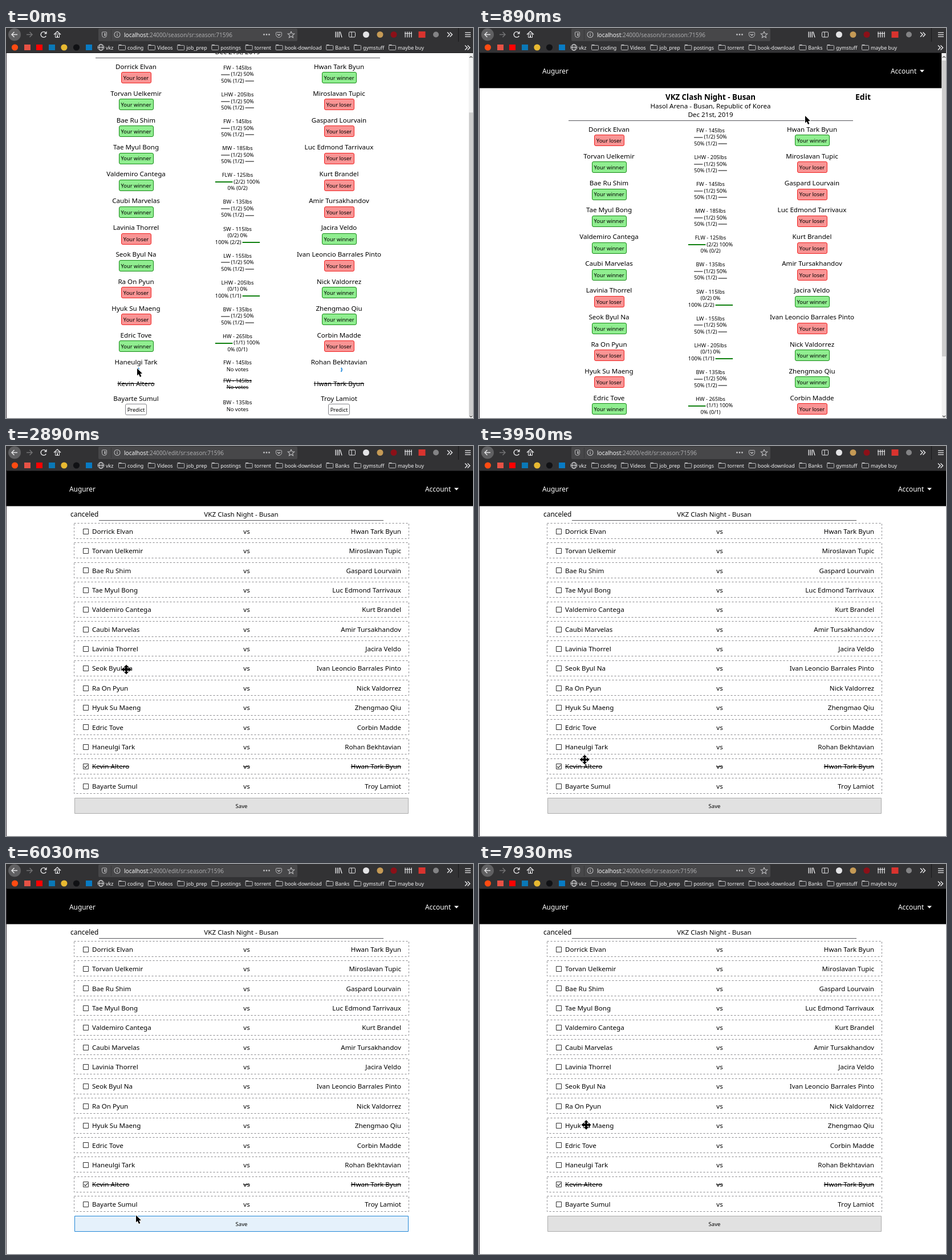
An HTML page with a canvas for the animation above (8 s loop, 819x684 px).

```html
<!DOCTYPE html>
<html lang="en">
<head>
<meta charset="utf-8">
<title>Fight predictions</title>
<style>
html, body { margin: 0; width: 100%; height: 100%; overflow: hidden; background: #fff; }
canvas { display: block; }
</style>
</head>
<body>
<canvas id="stage" width="819" height="684"></canvas>
<script>
const ctx = document.getElementById('stage').getContext('2d');
const LOOP = 8000, TICK = 125, FIRST_TICK = 15;
const SANS = '"Noto Sans", "Open Sans", sans-serif';
const VOTED = 140, EDIT_PAGE = 1680, CHECKED = 4930, UNCHECKED = 5360;
const EVENT = 'VKZ Clash Night - Busan';
const ROW_TOP = 135.6, ROW_PITCH = 34.38, ROW_HEIGHT = 28;
const INK = '#e4e4e6', SOFT = '#bcbcbe';

const limits = { FLW: 125, BW: 135, FW: 145, LW: 155, MW: 185, LHW: 205, HW: 265, SW: 115 };
// left, right, weight class, votes for left and in all, viewer's guess for left
const fights = `
Dorrick Elvan|Hwan Tark Byun|FW|1/2|loser
Torvan Uelkemir|Miroslavan Tupic|LHW|1/2|winner
Bae Ru Shim|Gaspard Lourvain|FW|1/2|winner
Tae Myul Bong|Luc Edmond Tarrivaux|MW|1/2|winner
Valdemiro Cantega|Kurt Brandel|FLW|2/2|winner
Caubi Marvelas|Amir Tursakhandov|BW|1/2|winner
Lavinia Thorrel|Jacira Veldo|SW|0/2|loser
Seok Byul Na|Ivan Leoncio Barrales Pinto|LW|1/2|winner
Ra On Pyun|Nick Valdorrez|LHW|0/1|loser
Hyuk Su Maeng|Zhengmao Qiu|BW|1/2|loser
Edric Tove|Corbin Madde|HW|1/1|winner
Haneulgi Tark|Rohan Bekhtavian|FW|1/1|winner
Kevin Altero|Hwan Tark Byun|FW|
Bayarte Sumul|Troy Lamiot|BW|`.trim().split('\n').map(row => row.split('|'));
const PENDING = 11, CANCELED = 12, OPEN = 13;

// where the pointer goes, and when
const moves = [
  { from: 140, to: 650, x: 520, y: 394 },
  { from: 650, to: 890, x: 572, y: 154 },
  { from: 900, to: 1400, x: 679, y: 122 },
  { from: 1680, to: 2640, x: 276, y: 175 },
  { from: 2700, to: 2890, x: 211, y: 392 },
  { from: 2890, to: 3680, x: 195, y: 554 },
  { from: 3810, to: 4700, x: 138, y: 531 },
  { from: 5360, to: 6010, x: 228, y: 616 },
  { from: 6030, to: 6160, x: 204, y: 597 },
  { from: 7180, to: 7900, x: 188, y: 457.5 }
];

const progress = (t, from, to) => Math.max(0, Math.min(1, (t - from) / (to - from)));
const easeOut = p => p * (2 - p);
const smooth = p => p * p * (3 - 2 * p);

function pointerAt(t) {
  const pos = { x: 230, y: 597 };
  for (const { from, to, x, y } of moves) {
    const p = easeOut(progress(t, from, to));
    pos.x += (x - pos.x) * p;
    pos.y += (y - pos.y) * p;
  }
  return pos;
}

function rect(x, y, w, h, color) {
  ctx.fillStyle = color;
  ctx.fillRect(x, y, w, h);
}

function dot(x, y, r, color) {
  ctx.fillStyle = color;
  ctx.beginPath();
  ctx.arc(x, y, r, 0, 7);
  ctx.fill();
}

function ring(x, y, r, color, width = 1.2, from = 0, to = 2 * Math.PI) {
  ctx.strokeStyle = color;
  ctx.lineWidth = width;
  ctx.beginPath();
  ctx.arc(x, y, r, from, to);
  ctx.stroke();
}

function path(points, x = 0, y = 0) {
  ctx.beginPath();
  for (const [dx, dy] of points) ctx.lineTo(x + dx, y + dy);
}

function line(points, color, width = 1.3) {
  path(points);
  ctx.strokeStyle = color;
  ctx.lineWidth = width;
  ctx.stroke();
}

// tip at x, y; arms trail by dx, dy, and the zero side spreads
function chevron(x, y, dx, dy, color, spread = 4) {
  const sx = dx ? 0 : spread, sy = dx ? spread : 0;
  line([[x + dx - sx, y + dy - sy], [x, y], [x + dx + sx, y + dy + sy]], color, 1.5);
}

function triangle(a, b, c, color) {
  path([a, b, c]);
  ctx.fillStyle = color;
  ctx.fill();
}

function box(x, y, w, h, r, fill, border) {
  ctx.beginPath();
  ctx.roundRect(x, y, w, h, r);
  if (fill) { ctx.fillStyle = fill; ctx.fill(); }
  if (border) { ctx.strokeStyle = border; ctx.lineWidth = 1; ctx.stroke(); }
}

// y is the middle of the capitals
function text(str, x, y, { size = 11.6, align = 'left', color = '#000', weight = 400, strike = false } = {}) {
  ctx.font = `${weight} ${size}px ${SANS}`;
  ctx.textAlign = align;
  ctx.fillStyle = color;
  ctx.fillText(str, x, Math.round(y + size * 0.36));
  const width = ctx.measureText(str).width;
  if (strike) {
    const left = align === 'center' ? x - width / 2 : align === 'right' ? x - width : x;
    rect(left, Math.round(y), width, 1, color);
  }
  return width;
}

function drawNavigation() {
  const y = 11.5;
  dot(15, y, 11, '#606062');
  [[15, -1, INK], [41, 1, '#737375']].forEach(([x, dir, color]) => {
    line([[x - 5, y], [x + 5, y]], color, 1.5);
    chevron(x + 5 * dir, y, -4.5 * dir, 0, color, 4.5);
  });
  ring(66, y, 4.8, INK, 1.5, 0.5, 5.4);
  triangle([71.5, y - 6], [71.5, y - 1], [66.8, y - 1], INK);
  chevron(90, y - 5.5, 0, 5.5, INK, 6);
  box(86.5, y - 1, 7, 6, 0, null, INK);
  rect(89, y + 1, 2, 4, INK);
}

function drawAddress(page) {
  const y = 11.5;
  box(162, 1, 349, 22, 2, '#474749');
  rect(184, 3, 1, 18, '#39393b');
  box(168.5, y - 4.5, 8, 9.5, [1, 1, 4, 4], null, SOFT);
  rect(172.5, y - 2.5, 2, 5, SOFT);
  ring(195, y, 5, SOFT, 1.1);
  rect(194.4, y - 0.7, 1.3, 3.5, SOFT);
  rect(194.4, y - 3, 1.3, 1.3, SOFT);
  const host = text('localhost', 207, 12, { size: 10, color: '#f4f4f5' });
  text(`:24000/${page}/sr:season:71596`, 207 + host, 12, { size: 10, color: '#aaaaac' });
  for (const side of [-1, 0, 1]) dot(457 + side * 4.5, y, 1.4, SOFT);
  box(473.5, y - 4, 10, 9, [1, 1, 5, 5], null, SOFT);
  chevron(478.5, y + 1.5, 0, -2.5, SOFT, 2.5);
  const star = Array.from({ length: 11 }, (_, i) => {
    const r = i % 2 ? 2.7 : 6, a = (i / 5 - 0.5) * Math.PI;
    return [500 + r * Math.cos(a), 12 + r * Math.sin(a)];
  });
  line(star, SOFT, 1.1);
}

function drawExtensions() {
  const y = 11.5;
  for (let i = 0; i < 3; i++) rect(577.5 + i * 3, 6.5, 1.4, 10, INK);
  line([[586, 6.5], [589, 16.5]], INK, 1.4);
  box(601.5, 7, 11, 9, 1.5, null, INK);
  rect(605.5, 7, 1, 9, INK);
  dot(631.5, y, 5.5, INK);
  dot(656, y, 5.5, '#c59a55');
  dot(680, y, 5.5, '#8c1018');
  for (let i = 0; i < 4; i++) rect(699.5 + i * 3.6, 6.5, 1.3, 10, INK);
  rect(699, 9, 13, 1, INK);
  rect(723.5, 6, 12, 11, '#d9332e');
  dot(754, y, 5, '#838385');
  rect(793, 0, 1, 24, '#19191b');
  for (let i = 0; i < 3; i++) rect(805, 7.5 + i * 3.5, 10, 1.3, INK);
  for (const [x, top] of [[778, y], [809, 34.5]])
    for (const shift of [0, 4.5]) chevron(x + shift, top, -4, 0, INK);
}

function drawBookmarks() {
  const y = 34;
  ['#ff4b12', '#e65245', '#ff0000', '#0a78b7', '#e8b931', '#101114', '#087bc4'].forEach((color, i) => {
    const x = 15.5 + i * 21.6;
    if (i === 0 || i === 4 || i === 5) dot(x, y, 5.6, color);
    else rect(Math.round(x - 5.5), y - 5, 11, 10, color);
  });
  ring(166.5, y, 5.3, INK, 1);
  ctx.beginPath();
  ctx.ellipse(166.5, y, 2.4, 5.3, 0, 0, 7);
  ctx.stroke();
  line([[161, y], [172, y]], INK, 1);
  const label = { size: 8.9, color: '#f3f3f4' };
  text('vkz', 175, y + 0.5, label);
  let x = 213;
  for (const name of 'coding,Videos,job_prep,postings,torrent,book-download,Banks,gymstuff,maybe buy'.split(',')) {
    box(x - 15.5, 30.5, 12, 8, 1, null, SOFT);
    rect(x - 15.5, 29, 5, 2, SOFT);
    x += text(name, x, y + 0.5, label) + 23.6;
  }
}

function drawBrowser(page) {
  rect(0, 0, 819, 44, '#323234');
  rect(0, 43, 819, 1, '#1a1a1c');
  drawNavigation();
  drawAddress(page);
  drawExtensions();
  drawBookmarks();
}

function drawHeader(y, right, accountX) {
  rect(1, y, right - 1, 61.5, '#000');
  const style = { size: 11.9, color: '#fff', weight: 500 };
  text('Augurer', 111, y + 31.5, style);
  text('Account', accountX, y + 31.5, style);
  const x = accountX + 55;
  triangle([x - 4, y + 29.5], [x + 4, y + 29.5], [x, y + 33.8], '#fff');
}

function button(label, x, y) {
  const [w, fill, border] = {
    'Your winner': [61, '#90ee90', '#168a16'],
    'Your loser': [53, '#f99494', '#f0201f'],
    'Predict': [38, '#fff', '#85858a']
  }[label];
  box(Math.round(x - w / 2) + 0.5, Math.round(y - 10) + 0.5, w - 1, 19, 2.5, fill, border);
  text(label, x, y + 0.5, { size: 9.4, align: 'center' });
}

function share(votes, total, y, lineFirst) {
  const part = votes / total, tally = `(${votes}/${total})`, percent = part * 100 + '%';
  const label = lineFirst ? `${tally} ${percent}` : `${percent} ${tally}`;
  ctx.font = `9.3px ${SANS}`;
  const bar = part * 30.5, gap = bar ? 2 : 0;
  const left = 406 - (ctx.measureText(label).width + gap + bar) / 2;
  const width = text(label, lineFirst ? left + bar + gap : left, y, { size: 9.3 });
  rect(lineFirst ? left : left + width + gap, Math.round(y - 0.5), bar, 2, part > 0.5 ? '#108010' : '#808080');
}

function drawScrollbar(scroll, pageHeight) {
  const track = 622;
  rect(811.5, 44, 7.5, 640, '#f1f1f1');
  rect(812, 57 + scroll / pageHeight * track, 7, 640 / pageHeight * track, '#cdcdcd');
  chevron(815.5, 50, 0, 2, '#555', 2.5);
  chevron(815.5, 682, 0, -2, '#555', 2.5);
}

function drawSeason(t, held) {
  const voted = t >= VOTED;
  const scroll = 110 * (1 - smooth(progress(held, 620, 880)));
  const mid = { align: 'center' }, small = { size: 9.3, align: 'center' };
  drawHeader(44 - scroll, 811.5, 722);
  text(EVENT, 406, 121 - scroll, { size: 13.3, weight: 700, align: 'center' });
  text('Edit', 660, 121 - scroll, { size: 14, weight: 700 });
  text('Hasol Arena - Busan, Republic of Korea', 406, 137 - scroll, mid);
  text('Dec 21st, 2019', 406, 152 - scroll, mid);
  rect(157, Math.round(162 - scroll), 499, 1, '#55555a');

  let y = 177.6 - scroll;
  fights.forEach(([left, right, weight, votes, guess], i) => {
    const strike = i === CANCELED, waiting = i === PENDING && !voted;
    const limit = `${weight} - ${limits[weight]}lbs`;
    text(left, 228, y, { align: 'center', strike });
    text(right, 584, y, { align: 'center', strike });
    if (votes && !waiting) {
      const [forLeft, total] = votes.split('/').map(Number);
      text(limit, 406, y + 2, small);
      share(forLeft, total, y + 13.5, true);
      share(total - forLeft, total, y + 25, false);
      button('Your ' + guess, 228, y + 19.7);
      button('Your ' + (guess === 'winner' ? 'loser' : 'winner'), 584, y + 19.7);
    } else {
      const top = y + (strike ? -5 : i === OPEN ? 7.7 : 1.3);
      text(limit, 406, top, { ...small, strike });
      text('No votes', 406, top + 11.7, { ...small, strike });
      for (const x of [228, 584]) {
        if (i === OPEN) button('Predict', x, y + 19.7);
        if (waiting) ring(x, y + 13.5, 5, '#2d8fdd', 2, -0.7, 0.8);
      }
    }
    y += i === PENDING ? (voted ? 51.2 : 37.7) : strike ? 26 : 47.1;
  });
  drawScrollbar(scroll, voted ? 767 : 750);
}

function checkbox(y, on, hot) {
  const color = hot ? '#0078d7' : '#333';
  const top = Math.round(y - 5) + 0.5;
  box(135.5, top, 9, 9, 0, '#fff', color);
  if (on) line([[137, top + 4.5], [139.2, top + 6.8], [143.4, top + 2.2]], color, 1.2);
}

function drawEdit(t, { x, y: py }) {
  drawHeader(44, 819, 735);
  text('canceled', 113, 119.5, { size: 11.9 });
  text(EVENT, 412.5, 119.5, { size: 11.6, align: 'center' });
  rect(163, 130, 499, 1, '#55555a');
  fights.forEach(([left, right], i) => {
    const top = ROW_TOP + i * ROW_PITCH, y = top + ROW_HEIGHT / 2;
    const strike = i === CANCELED || i === PENDING && t >= CHECKED && t < UNCHECKED;
    ctx.setLineDash([3, 3]);
    box(119.5, Math.floor(top) + 0.5, 587, ROW_HEIGHT - 1, 0, null, '#88888c');
    ctx.setLineDash([]);
    checkbox(y, strike, overCheckbox(x) && Math.abs(py - y) < 6);
    text(left, 151, y, { strike });
    text('vs', 422, y, { align: 'center', strike });
    text(right, 693, y, { align: 'right', strike });
  });
  const hot = py >= 615 && py < 646;
  box(120.5, 617.5, 585, 27, 0, hot ? '#e5f1fb' : '#e1e1e1', hot ? '#2186d6' : '#adadad');
  text('Save', 413, 631.5, { size: 9.6, align: 'center' });
}

function overCheckbox(x) {
  return x >= 134 && x <= 146;
}

function overRow({ x, y }) {
  const row = (y - ROW_TOP) / ROW_PITCH;
  return row >= 0 && row < fights.length && row % 1 < ROW_HEIGHT / ROW_PITCH &&
    x > 119 && x < 707 && !overCheckbox(x);
}

function drawArrow({ x, y }) {
  path([[0, 0], [0, 12.5], [2.8, 10], [5, 15], [7.4, 14], [5.2, 9.2], [9, 9]], x, y);
  ctx.closePath();
  ctx.strokeStyle = '#fff';
  ctx.lineWidth = 1.8;
  ctx.lineJoin = 'round';
  ctx.stroke();
  ctx.lineJoin = 'miter';
  ctx.fillStyle = '#000';
  ctx.fill();
}

function drawMoveCursor({ x, y }) {
  ctx.save();
  ctx.translate(x, y);
  for (let i = 0; i < 4; i++) {
    rect(-1.3, -5, 2.6, 5, '#000');
    triangle([0, -8.5], [4, -4], [-4, -4], '#000');
    ctx.rotate(Math.PI / 2);
  }
  ctx.rotate(Math.PI / 4);
  rect(-3, -3, 6, 6, '#000');
  ctx.restore();
}

function render(now) {
  const t = now % LOOP;
  const held = Math.max(0, Math.floor((t - FIRST_TICK) / TICK) * TICK + FIRST_TICK);
  const pointer = pointerAt(held), editing = t >= EDIT_PAGE;
  rect(0, 0, 819, 684, '#fff');
  if (editing) drawEdit(t, pointer);
  else drawSeason(t, held);
  rect(0, 44, 1, 640, '#39323c');
  drawBrowser(editing ? 'edit' : 'season');
  if (editing && overRow(pointer)) drawMoveCursor(pointer);
  else drawArrow(pointer);
}

const origin = performance.now();
function tick() {
  render(performance.now() - origin);
  requestAnimationFrame(tick);
}
tick();
</script>
</body>
</html>
```
